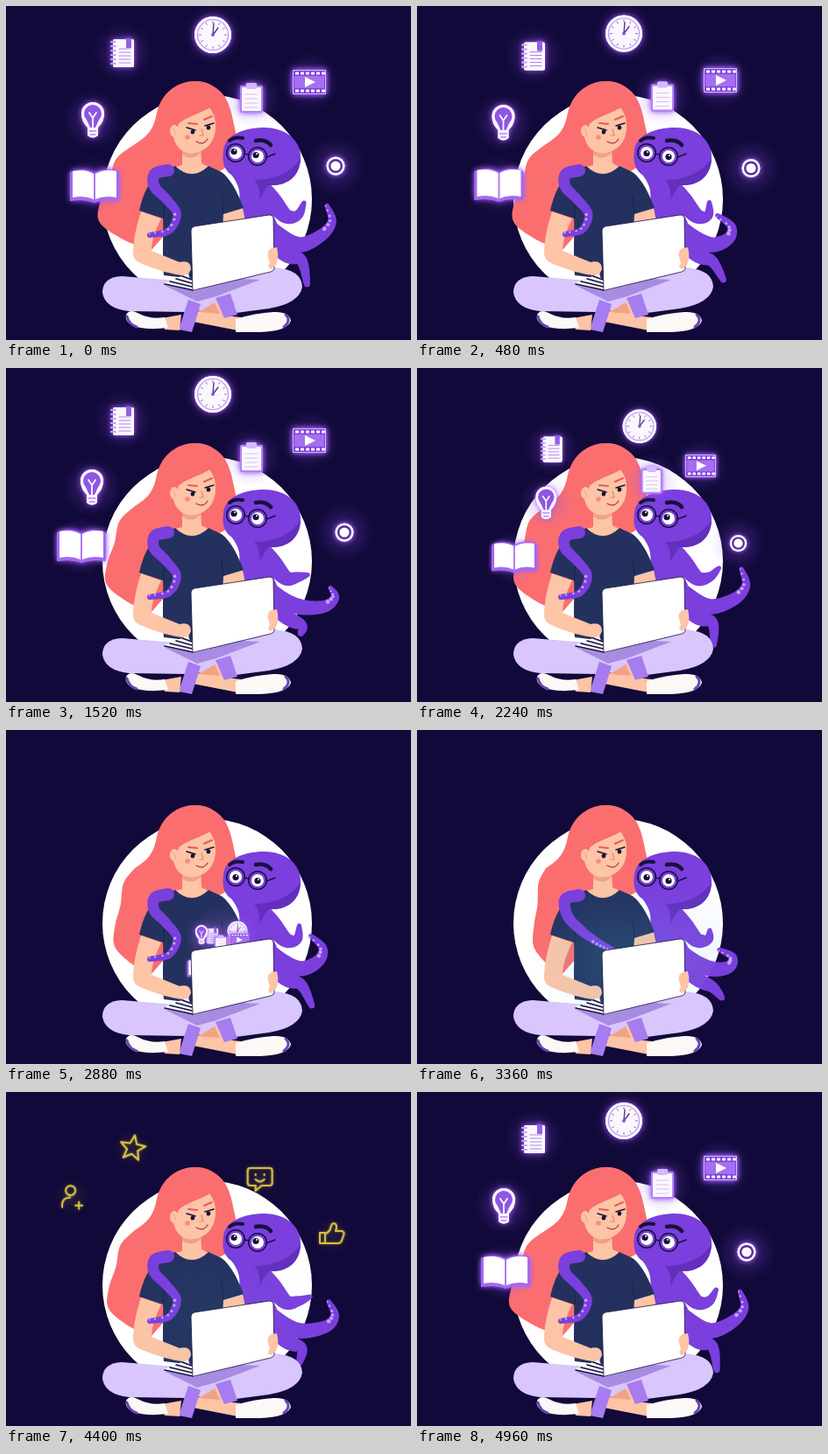
Animation of 462x382 px, one loop 5040 ms. Source, as an HTML page with a canvas:

```html
<!DOCTYPE html>
<html lang="en">
<head>
<meta charset="utf-8">
<title>Learning with an octopus</title>
<style>
html, body { margin: 0; width: 100%; height: 100%; overflow: hidden; background: #110939; }
canvas { display: block; }
</style>
</head>
<body>
<canvas id="stage" width="462" height="382"></canvas>
<script>
const ctx = document.getElementById('stage').getContext('2d');
const LOOP = 5040, STEP = 80, SWIM = LOOP / 2;
const C = {
  bg: '#110939', hair: '#fb6e70', hairDark: '#ec5a62', skin: '#fdc4a6', skinDark: '#efa286',
  shirt: '#24315f', pants: '#d8c6fc', cuff: '#a67cf0', octo: '#7a3fdc', octoDark: '#6230bd',
  ink: '#17113a', sucker: '#c7a2fa', icon: '#8e4fe6', pale: '#fbf7ff', yellow: '#f9e83f'
};

const { sin, cos, PI, min, max, hypot } = Math;
const clamp = (v, a = 0, b = 1) => min(b, max(a, v));
const ramp = (t, a, b) => clamp((t - a) / (b - a));
const smooth = u => u * u * (3 - 2 * u);
const rise = (t, a, b) => smooth(ramp(t, a, b));
const join = pts => pts.map(p => p.join(' ')).join('L');

function fill(d, color) {
  ctx.fillStyle = color;
  ctx.fill(new Path2D(d));
}
function line(d, color, width) {
  ctx.strokeStyle = color;
  ctx.lineWidth = width;
  ctx.lineCap = ctx.lineJoin = 'round';
  ctx.stroke(new Path2D(d));
}
function disc(x, y, r, color, ry = r) {
  ctx.beginPath();
  ctx.ellipse(x, y, r, ry, 0, 0, 7);
  ctx.fillStyle = color;
  ctx.fill();
}
function ring(x, y, r, color, width) {
  ctx.beginPath();
  ctx.arc(x, y, r, 0, 7);
  ctx.strokeStyle = color;
  ctx.lineWidth = width;
  ctx.stroke();
}
function box(x, y, w, h, color, r = 0) {
  ctx.beginPath();
  ctx.roundRect(x, y, w, h, r);
  ctx.fillStyle = color;
  ctx.fill();
}
function glow(x, y, r, rgb, alpha) {
  if (alpha <= 0) return;
  const g = ctx.createRadialGradient(x, y, 0, x, y, r);
  g.addColorStop(0, `rgba(${rgb},${alpha})`);
  g.addColorStop(0.5, `rgba(${rgb},${alpha * 0.5})`);
  g.addColorStop(1, `rgba(${rgb},0)`);
  ctx.fillStyle = g;
  ctx.fillRect(x - r, y - r, 2 * r, 2 * r);
}

// Catmull-Rom samples through the joints
function spline(p, n = 9) {
  const out = [];
  for (let i = 0; i < p.length - 1; i++) {
    const a = p[i - 1] || p[i], b = p[i], c = p[i + 1], d = p[i + 2] || c;
    for (let k = 0; k < n; k++) {
      const u = k / n;
      out.push([0, 1].map(j => b[j] + 0.5 * u * (c[j] - a[j] +
        u * (2 * a[j] - 5 * b[j] + 4 * c[j] - d[j] + u * (3 * (b[j] - c[j]) + d[j] - a[j])))));
    }
  }
  out.push(p[p.length - 1]);
  return out;
}
// Tapered tentacle; side puts suckers on one edge
function limb(joints, w0, w1, side = 0) {
  const s = spline(joints), last = s.length - 1, left = [], right = [], dots = [];
  s.forEach(([x, y], i) => {
    const a = s[max(0, i - 1)], b = s[min(last, i + 1)], k = i / last;
    const dx = b[0] - a[0], dy = b[1] - a[1], len = hypot(dx, dy) || 1;
    const r = (w0 + (w1 - w0) * k ** 1.5) / 2, nx = -dy / len, ny = dx / len;
    left.push([x + nx * r, y + ny * r]);
    right.unshift([x - nx * r, y - ny * r]);
    if (side && k > 0.62 && i % 3 === 0) dots.push([x + nx * r * side * 0.5, y + ny * r * side * 0.5, r * 0.36]);
  });
  fill('M' + join(left.concat(right)) + 'Z', C.octo);
  disc(...s[0], w0 / 2, C.octo);
  disc(...s[last], w1 / 2, C.octo);
  dots.forEach(d => disc(...d, C.sucker));
}

// x, y and how far the point follows the sway
const LOCKS = [[131, 175, 0.5], [126, 200, 0.75], [118, 225, 1], [118, 248, 1], [141, 268, 0.5]];
function hair(t) {
  const a = 2 * PI * t / LOOP;
  const sway = -9 * cos(a - 1.05) - 7.3 * cos(2 * a + 0.5);
  const edge = spline([[147, 158], ...LOCKS.map(([x, y, k]) => [x + k * sway, y]), [166, 279]]);
  fill('M216 86C196 86 178 98 172 122C169 140 162 149 147 158L' + join(edge) +
    'L200 240L240 190C262 184 266 160 261 140C257 120 254 104 240 94C232 88 224 86 216 86Z', C.hair);
}

function octopus(t) {
  const phase = t % SWIM / SWIM, a = 2 * PI * phase, s = sin(a), c = cos(a), c2 = cos(2 * a);
  limb([[285, 204], [303, 222], [319, 240], [333 - s, 239], [340 - 7 * s, 230 - 5 * c - 4 * s]], 24, 5);
  limb([[288, 255], [319, 284], [337, 293 - 2 * c], [342 + 7.5 * sin(a + 0.2), 310 + 8 * c]], 20, 7);
  limb([[280, 236], [308, 261], [335, 273], [360 - 5 * s, 268 - 6 * c],
    [369 - 9 * s + 3 * c2, 255 - 9 * c], [360 - 14 * s + 6 * c2, 242 - 14 * cos(a + 0.2)]], 22, 5, -1);
  fill('M248 166C249 148 270 140 292 139C320 138 338 155 336 176C334 198 318 206 300 205C295 215 300 230 309 248L260 246L266 225C268 210 264 202 257 193C249 188 246 178 248 166Z', C.octo);
  fill('M336 174C326 190 306 199 283 199C288 203 290 212 289 222C294 213 297 207 300 205C320 206 335 196 336 174Z', C.octoDark);
  const [dx, dy] = phase > 0.08 && phase < 0.56 ? [0, 0.5] : [-2, -1.5];
  [[262, 168], [287, 172]].forEach(([x, y]) => {
    disc(x, y, 7, '#fff');
    disc(x + dx, y + dy, 3.6, C.ink);
    disc(x + dx + 1, y + dy - 1.4, 1, '#fff');
    ring(x, y, 10.3, C.ink, 1.5);
  });
  line('M272 169L277 170M297 173L307 169', C.ink, 1.4);
  line('M255 154Q261 149 270 151', C.ink, 4);
  line('M285 154Q296 152 302 159', C.ink, 4.5);
}

function hug(t) {
  const phase = t % SWIM / SWIM;
  const out = rise(phase, 0.16, 0.33) * (1 - rise(phase, 0.4, 0.52));
  const rest = [[185, 188], [170, 192], [169, 206], [183, 221], [195, 238], [186, 257], [164, 262]];
  const far = [[185, 189], [169, 194], [172, 213], [187, 229], [202, 240], [214, 247], [224, 252]];
  limb(rest.map((p, i) => p.map((v, j) => v + (far[i][j] - v) * out)), 14, 6, 1);
}

function legs() {
  fill('M200 330L305 299Q337 301 338 321Q335 340 300 346L240 354Z', C.pants);
  fill('M181 313L132 309Q110 310 110 328Q113 346 140 349L206 350L250 345L270 322Z', C.pants);
  fill('M180 319L214 326L268 312L290 313L240 332L218 338Z', '#a78ce2');
  fill('M218 350L241 338L249 354L268 356L264 371L213 361Z', C.skin);
  fill('M220 350L238 339L244 352Z', C.skinDark);
  fill('M239 334L256 329L264 353L249 357Z', C.cuff);
  fill('M208 336L222 341L212 373L197 370Z', C.cuff);
  fill('M178 357L200 353L198 371L181 370Z', C.skin);
  fill('M137 353Q141 346 150 351Q165 359 181 356L185 368Q160 371 145 366Q135 361 137 353Z', '#fcf8f6');
  fill('M262 358Q285 351 305 350Q323 349 325 360Q321 372 290 373L262 373Z', '#fcf8f6');
  line('M138 355Q140 364 149 367M319 353Q326 360 317 367', '#6a45b4', 3);
}

function torso() {
  fill('M248 238L270 231L273 246L247 249Z', C.skin);
  fill('M201 155L201 182L193 184Q212 202 231 184L223 180L222 160Z', C.skin);
  fill('M193 183Q212 201 231 183L246 190C258 199 266 218 271 231L248 238L247 258L213 260L213 312L180 308C178 280 180 255 179 243L152 234C156 215 164 198 176 190Z', C.shirt);
  line('M182 216Q179 230 180 242M246 218L248 237', '#172247', 1);
  fill('M154 235L177 243C171 256 166 268 166 280L198 293Q211 290 211 301L207 309Q180 306 153 294Q144 290 145 280C146 262 150 248 154 235Z', C.skin);
}

function face() {
  fill('M201 160Q212 172 222 164L222 168Q212 178 201 170Z', C.skinDark);
  fill('M190 120L191 150C194 165 206 170 216 168C229 165 239 155 239 138L238 112Q215 98 190 120Z', C.skin);
  fill('M232 116C220 123 206 126 197 134L195 143C190 134 187 142 186 157L174 135C176 104 194 86 216 86C238 86 252 104 256 122C260 140 256 155 245 154C240 140 240 126 232 116Z', C.hair);
  line('M232 116C220 123 206 126 197 134', C.hairDark, 0.7);
  disc(192, 143, 5, C.skin, 7);
  line('M190 140Q194 142 193 147', C.skinDark, 1);
  disc(207, 150, 2.8, '#fa8b80');
  disc(213, 144, 2.3, C.ink, 2.6);
  disc(231, 139, 2.3, C.ink, 2.6);
  line('M206 139L216 142M227 137L237 134', C.ink, 1.4);
  line('M208 134L218 135M226 130L235 126', '#e75b59', 2);
  line('M223 141L225 148L221 148', '#e4846e', 1.1);
  line('M217 155Q225 160 230 152', '#b83a4a', 1.3);
}

function laptop(shine) {
  fill('M180 317L208 306L214 325Z', shine > 0.3 ? '#a9eef2' : '#f2f2fa');
  line('M181 318L213 325M187 315L212 321M194 312L212 317M201 309L212 313', C.ink, 1.6);
  const lid = 'M213 325L211 257Q211 253 215 252L300 239Q305 239 305 243L306 300Q306 303 302 304Z';
  fill(lid, '#fff');
  line(lid, C.ink, 0.8);
  fill('M299 287Q297 280 303 277L309 276Q312 288 308 296L302 301Q297 299 301 294Z', C.skin);
}

const art = {
  book() {
    fill('M-28 -16Q-12 -22 0 -15Q12 -22 28 -16L28 17Q12 14 0 19Q-12 14 -28 17Z', '#a469f2');
    fill('M-25 -17Q-11 -20 -1 -14L-1 15Q-12 10 -25 13ZM25 -17Q11 -20 1 -14L1 15Q12 10 25 13Z', '#fff');
    line('M0 -14L0 16', '#b78af4', 1);
  },
  bulb() {
    fill('M-6 9Q-13 2 -13 -7A13 13 0 0 1 13 -7Q13 2 6 9L6 18Q0 23 -6 18Z', C.pale);
    disc(0, -7, 10, '#8f55e4');
    fill('M-8 -2L8 -2L3 9L-3 9Z', '#8f55e4');
    line('M0 9L0 -2L-4 -8M0 -2L4 -8', C.pale, 1.8);
    line('M-4 13L4 13M-3 17L3 17', C.icon, 1);
  },
  notebook() {
    box(-11, -15, 24, 32, C.pale, 2);
    box(4, -16, 6, 11, '#9460e5');
    for (let y = -12; y < 16; y += 5) line(`M-13 ${y}L-8 ${y}`, '#c8a2fa', 1.8);
    for (let y = -4; y < 14; y += 4) line(`M-4 ${y}L9 ${y}`, '#ae84ed', 1);
  },
  clock() {
    disc(0, 0, 21, C.pale);
    ring(0, 0, 17.5, '#b995ea', 1.2);
    for (let a = 0; a < 6.2; a += PI / 6) line(`M${13.5 * cos(a)} ${13.5 * sin(a)}L${15.5 * cos(a)} ${15.5 * sin(a)}`, '#8f66bf', 1);
    line('M0 0L1 -13M0 0L6 -8', '#56358a', 1.4);
    disc(0, 0, 2, '#8f55e4');
  },
  clipboard() {
    box(-13, -14, 26, 31, '#b184f5', 2);
    box(-11, -12, 22, 27, C.pale, 1);
    box(-6, -17, 12, 7, '#d6bafb', 2);
    for (let y = -4; y < 12; y += 5) line(`M-7 ${y}L7 ${y}`, '#d4c0ee', 1);
  },
  film() {
    box(-19, -14, 38, 28, '#d6b8ff', 1);
    box(-18, -13, 36, 26, '#7e42dc', 1);
    for (let x = -16; x < 16; x += 6) [-11.5, 8.5].forEach(y => box(x, y, 4, 3, C.pale, 0.5));
    box(-17, -7, 34, 14, '#a66ef0');
    fill('M-5 -6L7 0L-5 6Z', '#fff');
  },
  dot() {
    disc(0, 0, 10.5, C.pale);
    disc(0, 0, 8, '#5a2d98');
    disc(0, 0, 5.6, '#fff');
  }
};

// Where each icon hangs, how it drifts, where it dives, and the sideways bow of the dive
const ICONS = [
  { draw: art.notebook, home: [133, 53], drift: [0, 7], end: [235, 235], bow: 2 },
  { draw: art.clock, home: [236, 33], drift: [0, -3], end: [264, 230], bow: 13 },
  { draw: art.clipboard, home: [280, 105], drift: [0, -3], end: [245, 244], bow: -6 },
  { draw: art.film, home: [346, 87], drift: [0, -4], end: [266, 240], bow: -8 },
  { draw: art.dot, home: [376, 183], drift: [10, 5], end: [280, 256], bow: 0 },
  { draw: art.bulb, home: [99, 130], drift: [-1, 6], end: [223, 234], bow: 27 },
  { draw: art.book, home: [101, 206], drift: [-15, -2], end: [222, 273], bow: 0 }
];

// Drawn twice so that the glow stays behind the inner details
function lit(x, y, size, alpha, color, blur, draw) {
  ctx.save();
  ctx.translate(x, y);
  ctx.scale(size, size);
  ctx.globalAlpha = alpha;
  ctx.shadowColor = color;
  ctx.shadowBlur = blur;
  draw();
  ctx.shadowColor = 'transparent';
  draw();
  ctx.restore();
}
function icons(t) {
  const back = t > 4400;
  const alpha = back ? ramp(t, 4480, 4800) : 1 - ramp(t, 2880, 3040);
  if (alpha <= 0) return;
  const float = back ? 0 : rise(t, 0, 960);
  const u = back ? 0 : max(0, (t - 1760) / 1120), dive = u * u;
  const size = back ? 0.8 + 0.2 * smooth(alpha) : 1 - 0.46 * dive;
  ICONS.forEach(({ draw, home, drift, end, bow }) => {
    const [x, y] = home.map((h, i) => {
      const from = h + drift[i] * float;
      return from + (end[i] - from) * dive;
    });
    const bx = x + bow * sin(PI * min(1, u));
    glow(bx, y, 34 * size, '146,82,240', 0.32 * alpha);
    lit(bx, y, size, alpha, '#a55cff', 6 * size, draw);
  });
}

const star = 'M' + join(Array.from({ length: 10 }, (_, i) => {
  const r = i % 2 ? 6.5 : 15, a = i * PI / 5 - 1.4;
  return [r * cos(a), r * sin(a)];
})) + 'Z';
const REWARDS = [
  [-51, -88, star],
  [-83, -62, 'M-7 -8A5.5 5.5 0 1 0 4 -8A5.5 5.5 0 1 0 -7 -8M-11 11Q-12 0 -2 0M4 9L12 9M8 5L8 13'],
  [16, -72, 'M-11 -12L11 -12Q14 -12 14 -9L14 5Q14 8 11 8L2 8L-5 14L-5 8L-11 8Q-14 8 -14 5L-14 -9Q-14 -12 -11 -12M-5 -5L-5 -4M5 -5L5 -4M-5 1Q0 6 5 1'],
  [54, -42, 'M-14 -3L-8 -3L-8 9L-14 9ZM-8 -2Q-2 -4 -1 -11Q0 -15 4 -13Q6 -10 4 -5L11 -5Q15 -4 13 0L11 6Q10 9 7 9L-8 9']
];
function rewards(t) {
  if (t < 3360 || t > 4560) return;
  const u = (t - 3360) / 480;
  const alpha = ramp(t, 3360, 3520) * (1 - ramp(t, 4240, 4560));
  REWARDS.forEach(([dx, dy, d]) => {
    const x = 255 + dx * u, y = 255 + dy * u;
    glow(x, y, 22, '255,225,70', 0.16 * alpha);
    lit(x, y, min(1, 0.4 + 0.6 * u), alpha, '#ffe04a', 3, () => line(d, C.yellow, 2));
  });
}

function screenLight(shine) {
  if (shine <= 0) return;
  ctx.save();
  ctx.beginPath();
  ctx.arc(229.5, 221, 119.5, 0, 7);
  ctx.clip();
  glow(222, 264, 92, '70,205,225', 0.62 * shine);
  glow(312, 260, 85, '120,220,245', 0.36 * shine);
  ctx.restore();
  glow(330, 250, 75, '120,90,220', 0.1 * shine);
}

function draw(t) {
  ctx.fillStyle = C.bg;
  ctx.fillRect(0, 0, 462, 382);
  const shine = rise(t, 3200, 3680) * (1 - rise(t, 4000, 4480));
  disc(229.5, 221, 119.5, '#fff');
  hair(t);
  octopus(t);
  torso();
  face();
  hug(t);
  screenLight(shine);
  glow(247, 244, 42, '205,120,250', 0.3 * ramp(t, 2480, 2800) * (1 - ramp(t, 2880, 3120)));
  icons(t);
  rewards(t);
  legs();
  laptop(shine);
}

const start = performance.now();
function tick() {
  const t = (performance.now() - start) % LOOP;
  draw(Math.floor(t / STEP) * STEP);
  requestAnimationFrame(tick);
}
tick();
</script>
</body>
</html>
```
